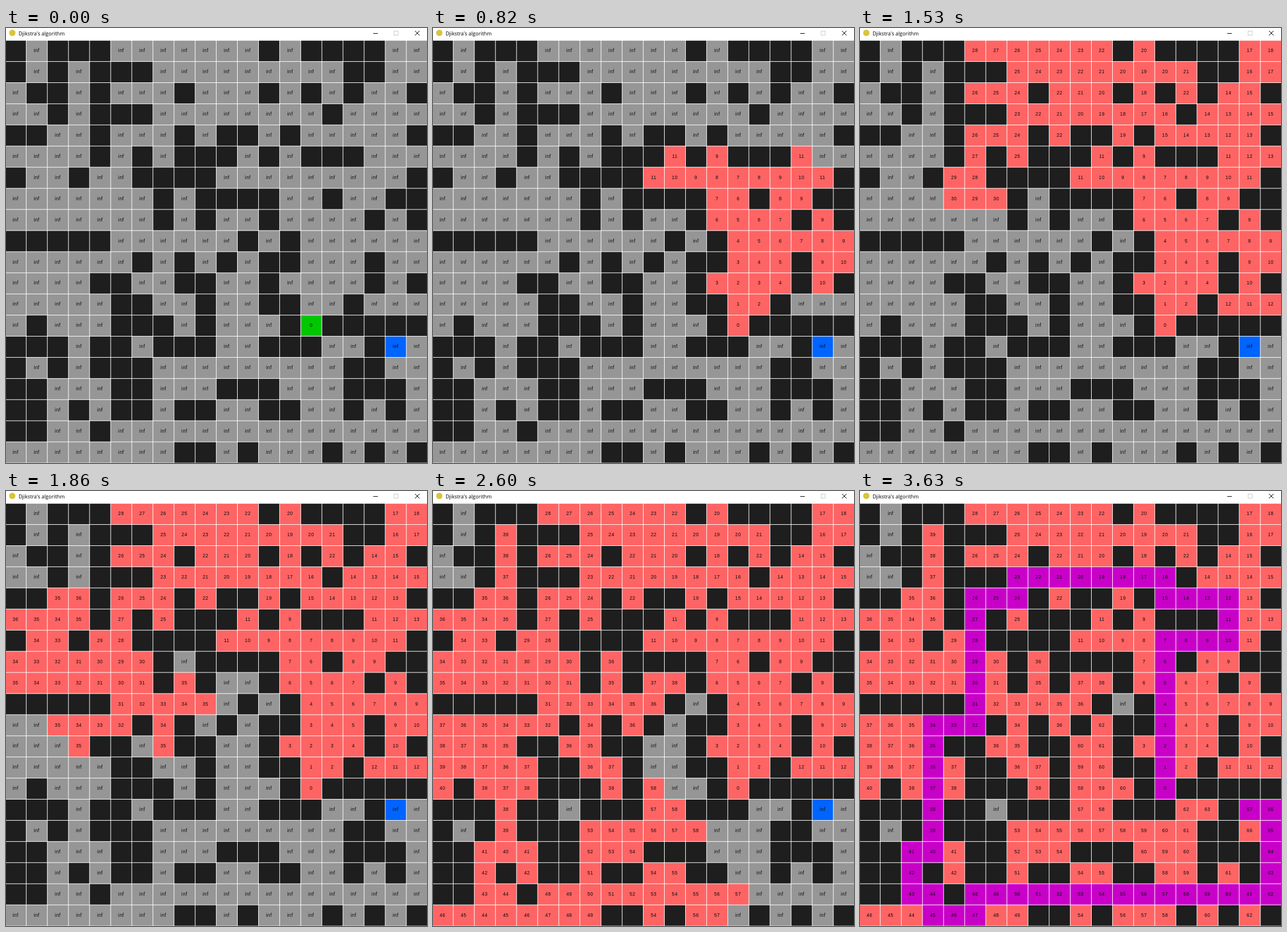
Animation of 736 by 760 pixels, one loop 3980 ms. Source, as an HTML page:

```html
<!DOCTYPE html>
<html lang="en">
<head>
<meta charset="utf-8">
<title>Djikstra's algorithm</title>
<style>
  html, body { margin: 0; width: 100%; height: 100%; overflow: hidden; background: #fff; }
  svg { display: block; width: 736px; height: 760px; }
  .cell { font: 8.3px "Liberation Sans", Arial, sans-serif; letter-spacing: .5px; text-anchor: middle; fill: #0a0a0a; }
  .title { font: 9px "Open Sans", "Noto Sans", sans-serif; fill: #000; }
</style>
</head>
<body>
<svg id="stage" viewBox="0 0 736 760">
  <rect width="736" height="760" fill="#fff"/>
  <circle cx="11" cy="8.5" r="5.5" fill="#d9c43c"/>
  <text class="title" x="22" y="13">Djikstra's algorithm</text>
  <path d="M642 9.5h8" stroke="#000"/>
  <rect x="678.5" y="5.5" width="7" height="7" fill="none" stroke="#ccc"/>
  <path d="M715 5l8 8M723 5l-8 8" stroke="#000" fill="none"/>
</svg>
<script>
const LOOP = 3980, PITCH = 36.92, LEFT = -1.1, TOP = 22.15;
const COLOR = { wall: '#1e1e1e', open: '#969696', seen: '#ff6464', path: '#c800c8', start: '#00c800', goal: '#0064ff' };
const MAP = [
  '#.###.......#.####..',
  '#.#.###.........##..',
  '.##.#...#...#.#.#..#',
  '..#.###........#....',
  '##..#...#.##.#.....#',
  '....#.#.###.#.###...',
  '#..#..####.........#',
  '.......#.####..#..##',
  '.......#.#..#....#.#',
  '#####......#.#......',
  '......#.#.#.##...#..',
  '....##..##..#....#.#',
  '.....##..#..##..#...',
  '.#...###.#...#.#####',
  '###.##.###..###..#..',
  '#.#.###.........##..',
  '##...##...###...###.',
  '##.#.##.##..##..#.#.',
  '##..#...............',
  '........##.#...#.#.#'
];
const N = 20, START = 13 * N + 14, GOAL = 14 * N + 18;
const wall = i => MAP[Math.floor(i / N)][i % N] === '#';

function neighbours(i) {
  const c = i % N, list = [];
  if (i >= N) list.push(i - N);
  if (c > 0) list.push(i - 1);
  if (c < N - 1) list.push(i + 1);
  if (i < N * (N - 1)) list.push(i + N);
  return list.filter(j => !wall(j));
}

// Nearest open cell first, ties in reading order
function search() {
  const dist = Array(N * N).fill(Infinity), from = {}, done = new Set(), seen = [START];
  dist[START] = 0;
  for (;;) {
    let cur = -1;
    for (let i = 0; i < N * N; i++) {
      if (!done.has(i) && dist[i] < (cur < 0 ? Infinity : dist[cur])) cur = i;
    }
    if (cur < 0 || cur === GOAL) break;
    done.add(cur);
    for (const j of neighbours(cur)) {
      if (dist[j] <= dist[cur] + 1) continue;
      dist[j] = dist[cur] + 1;
      from[j] = cur;
      seen.push(j);
    }
  }
  const path = [];
  for (let i = GOAL; i !== undefined; i = from[i]) path.push(i);
  return { dist, seen, path };
}

const { dist, seen, path } = search();
const seenAt = Array(N * N).fill(Infinity), pathAt = Array(N * N).fill(Infinity);
seen.forEach((i, k) => seenAt[i] = k);
path.forEach((i, k) => pathAt[i] = seen.length + k);

const stage = document.getElementById('stage');
function add(tag, attrs) {
  const el = document.createElementNS('http://www.w3.org/2000/svg', tag);
  for (const k in attrs) el.setAttribute(k, attrs[k]);
  return stage.appendChild(el);
}

const cells = [];
for (let i = 0; i < N * N; i++) {
  const x = LEFT + PITCH * (i % N), y = TOP + PITCH * Math.floor(i / N);
  const box = add('rect', { x, y, width: PITCH - 1, height: PITCH - 1, fill: COLOR.wall });
  if (!wall(i)) cells.push({ i, box, label: add('text', { class: 'cell', x: x + 17.7, y: y + 20.2 }) });
}

// Screen refreshes come in bursts of twelve
const BURSTS = [440, 1010, 1580, 2140, 2700, 3250];
function refreshes(t) {
  const b = BURSTS.filter(s => t >= s).length - 1;
  if (b < 0) return 0;
  const last = b === BURSTS.length - 1 ? 8 : 11;
  return 12 * b + 1 + Math.min(last, Math.floor((t - BURSTS[b] + 2) / 46));
}

// Cells handled after a given number of refreshes
const PACE = [[0, 0], [9, 40], [18, 79], [31, 137], [47, 208], [57, 255], [60, 267], [69, 308]];
function progress(n) {
  const k = Math.max(1, PACE.findIndex(p => p[0] >= n));
  const [n0, v0] = PACE[k - 1], [n1, v1] = PACE[k];
  return Math.floor(v0 + (v1 - v0) * (n - n0) / (n1 - n0) + 1e-6);
}

function colorOf(i, count) {
  if (pathAt[i] < count) return COLOR.path;
  if (seenAt[i] < count) return COLOR.seen;
  return i === START ? COLOR.start : i === GOAL ? COLOR.goal : COLOR.open;
}

let shown = -1;
function render(t) {
  const count = progress(refreshes(t));
  if (count === shown) return;
  shown = count;
  for (const { i, box, label } of cells) {
    box.setAttribute('fill', colorOf(i, count));
    label.textContent = i === START || seenAt[i] < count ? dist[i] : 'inf';
  }
}

const t0 = performance.now();
function tick() {
  render((performance.now() - t0) % LOOP);
  requestAnimationFrame(tick);
}
tick();
</script>
</body>
</html>
```
